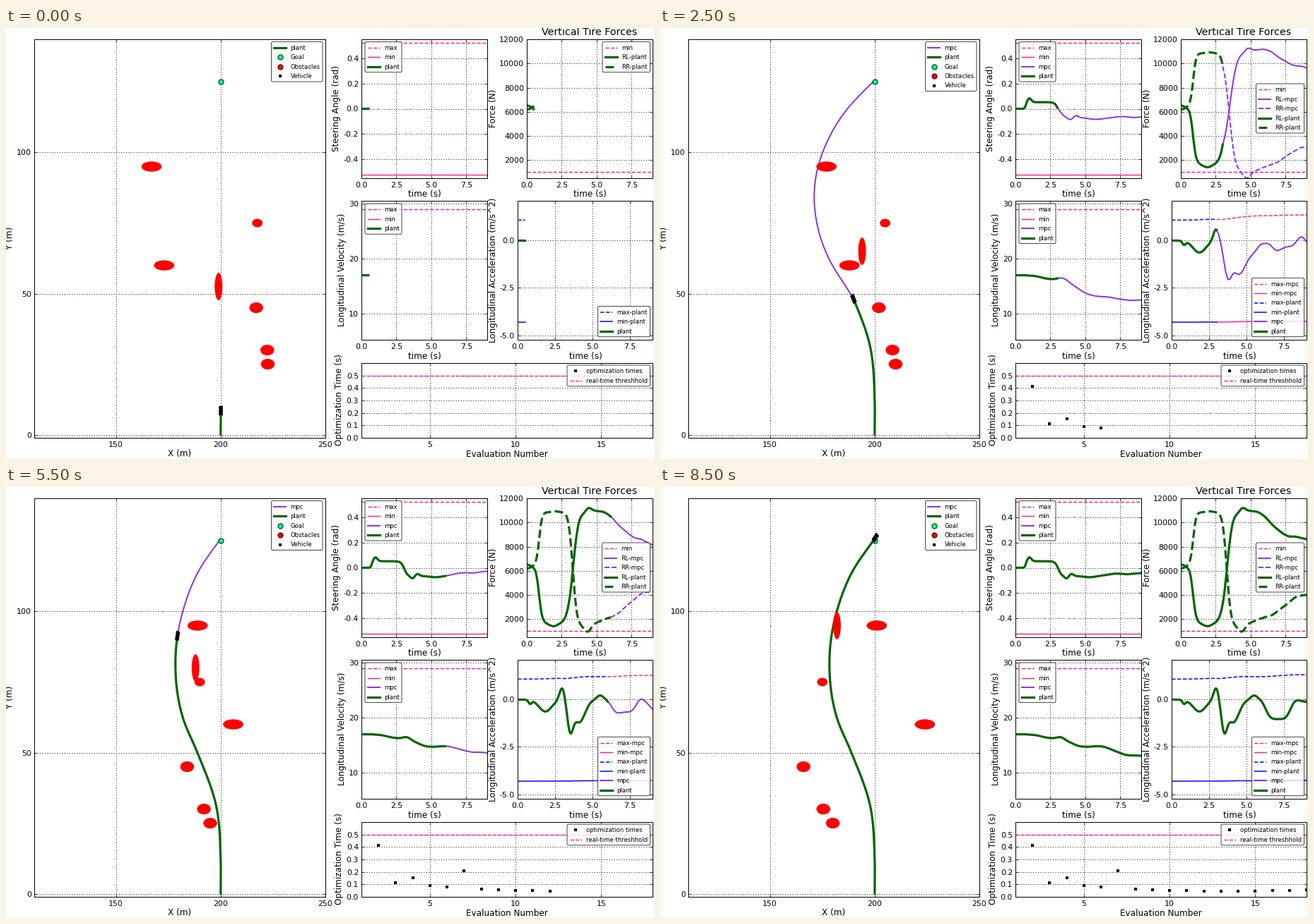
These frames come from a looping animation (917 px wide and 611 px high, 9000 ms). A matplotlib script:

```python
import numpy as np
import matplotlib.pyplot as plt
from matplotlib.animation import FuncAnimation
from matplotlib.patches import Ellipse, FancyBboxPatch, Polygon

W, H = 917, 611
PX = 0.72  # points per pixel at 100 dpi
FRAMES, STEP = 18, 500
PINK, VIOLET, GREEN = "#ff1493", "#8a2be2", "#006400"

plt.rcParams.update({
    "font.family": "DejaVu Sans",
    "axes.unicode_minus": False,
    "axes.linewidth": PX,
    "axes.axisbelow": True,
})


def style(color, width, dash="-"):
    return dict(color=color, lw=width * PX, ls=dash)


def dot(shape, size, face, edge=0):
    return dict(ls="none", marker=shape, ms=size * PX, mfc=face,
                mec="black", mew=edge * PX)


LIMIT, LIMIT_DASH = style(PINK, 1.4), style(PINK, 1.4, "--")
BLUE, BLUE_DASH = style("blue", 1.5), style("blue", 1.5, "--")
MPC, MPC_DASH = style(VIOLET, 1.9), style(VIOLET, 1.9, "--")
PLANT, PLANT_DASH = style(GREEN, 3.2), style(GREEN, 3.2, "--")
GOAL = dot("o", 7.3, "#00ff7f", 0.9)
OBSTACLE = dot("o", 7.3, "red", 0.9)
VEHICLE = dot("s", 4, "black")
TIMING = dot("s", 3.2, "black")

fig = plt.figure(figsize=(W / 100, H / 100), dpi=100, facecolor="white")


def panel(box, xlim, ylim, xticks, yticks, fmt="%.1f"):
    left, top, right, bottom = box
    ax = fig.add_axes([left / W, 1 - bottom / H, (right - left) / W, (bottom - top) / H])
    ax.set(xlim=xlim, ylim=ylim)
    ax.set_xticks(xticks, [("%.1f" if xlim[1] == 9 else "%d") % v for v in xticks])
    ax.set_yticks(yticks, [fmt % v for v in yticks])
    ax.tick_params(direction="in", top=True, right=True, length=4 * PX,
                   width=0.7 * PX, labelsize=11 * PX)
    ax.tick_params(axis="x", pad=5 * PX)
    ax.tick_params(axis="y", pad=4 * PX)
    ax.grid(color="black", lw=0.7 * PX, ls=(0, (2, 3)))
    return ax


SECONDS = [0, 2.5, 5, 7.5]
world = panel((40, 16, 452, 581), (111, 250), (-1.1, 140.1),
              [150, 200, 250], [0, 50, 100], "%d")
steer_ax = panel((503, 16, 681, 213), (0, 9), (-0.55, 0.55),
                 SECONDS, [-0.4, -0.2, 0, 0.2, 0.4])
force_ax = panel((737, 16, 915, 213), (0, 9), (0.5, 12),
                 SECONDS, [2, 4, 6, 8, 10, 12], "%d000")
speed_ax = panel((503, 245, 681, 442), (0, 9), (5.3, 30.5),
                 SECONDS, [10, 20, 30], "%d")
accel_ax = panel((724, 245, 915, 442), (0, 9), (-5.24, 2.1),
                 SECONDS, [-5, -2.5, 0])
timing_ax = panel((503, 475, 915, 581), (1, 18), (0, 0.6),
                  [5, 10, 15], [0, 0.1, 0.2, 0.3, 0.4, 0.5])

# Overlay in pixel coordinates for labels and legends
over = fig.add_axes([0, 0, 1, 1], zorder=5)
over.set(xlim=(0, W), ylim=(H, 0))
over.set_axis_off()


def label(x, y, text, size=12, angle=0):
    over.text(x, y, text, fontsize=size * PX, rotation=angle, ha="center", va="center")


for x, y in [(592, 236), (826, 236), (592, 465), (820, 465)]:
    label(x, y, "time (s)")
label(246, 604, "X (m)")
label(709, 604, "Evaluation Number")
label(826, 6.5, "Vertical Tire Forces", 14.3)
label(5, 298, "Y (m)", angle=90)
label(468, 114, "Steering Angle (rad)", angle=90)
label(689, 114, "Force (N)", angle=90)
label(475, 343, "Longitudinal Velocity (m/s)", angle=90)
label(689, 343, "Longitudinal Acceleration (m/s^2)", angle=90)
label(472, 527, "Optimization Time (s)", angle=90)


def legend(left, top, right, rows):
    height = 16.4 + 13.4 * (len(rows) - 1)
    frame = FancyBboxPatch((left, top), right - left, height,
                           boxstyle="round,pad=0,rounding_size=2", fc="white",
                           ec="black", lw=0.9 * PX, alpha=0.8, zorder=2)
    parts = [over.add_patch(frame)]
    for i, (text, look) in enumerate(rows):
        y = top + 8.4 + 13.4 * i
        xs = [left + 12] if "marker" in look else [left + 3.5, left + 20.5]
        parts += over.plot(xs, [y] * len(xs), zorder=3, **look)
        parts.append(over.text(left + 27, y + 3, text, fontsize=8.5 * PX, zorder=3))
    return parts


world_rows = [("plant", PLANT), ("Goal", GOAL), ("Obstacles", OBSTACLE), ("Vehicle", VEHICLE)]
limit_rows = [("max", LIMIT_DASH), ("min", LIMIT)]
mpc_row, plant_row = [("mpc", MPC)], [("plant", PLANT)]
force_rows = [("RL-plant", PLANT), ("RR-plant", PLANT_DASH)]
accel_rows = [("max-plant", BLUE_DASH), ("min-plant", BLUE)]

first_legends = (
    legend(375.5, 19.5, 448, world_rows)
    + legend(508, 19.5, 560, limit_rows + plant_row)
    + legend(844, 19.5, 911.5, [("min", LIMIT_DASH)] + force_rows)
    + legend(508, 249, 560, limit_rows + plant_row)
    + legend(837.5, 394.5, 911.5, accel_rows + plant_row)
)
full_legends = (
    legend(375.5, 19.5, 448, mpc_row + world_rows)
    + legend(508, 19.5, 560, limit_rows + mpc_row + plant_row)
    + legend(843.5, 79, 911.5, [("min", LIMIT_DASH), ("RL-mpc", MPC),
                                ("RR-mpc", MPC_DASH)] + force_rows)
    + legend(508, 249, 560, limit_rows + mpc_row + plant_row)
    + legend(837.5, 354.3, 911.5, [("max-mpc", LIMIT_DASH), ("min-mpc", LIMIT)]
             + accel_rows + mpc_row + plant_row)
)
legend(794, 478, 911.5, [("optimization times", TIMING), ("real-time threshhold", LIMIT_DASH)])


def bell(x, center, width, power=2):
    return np.exp(-np.abs((x - center) / width) ** power)


def step(x, center, width):
    return 0.5 + 0.5 * np.tanh((x - center) / width)


def integral(y, x):
    return np.concatenate([[0], np.cumsum((y[1:] + y[:-1]) / 2 * np.diff(x))])


def smooth(x, xp, yp):
    """Cubic Hermite curve through the given points."""
    xp, yp = np.asarray(xp, float), np.asarray(yp, float)
    slope = np.gradient(yp, xp)
    i = np.clip(np.searchsorted(xp, x) - 1, 0, len(xp) - 2)
    h = xp[i + 1] - xp[i]
    u = (x - xp[i]) / h
    return ((1 + 2 * u) * (1 - u) ** 2 * yp[i] + u * (1 - u) ** 2 * h * slope[i]
            + u * u * (3 - 2 * u) * yp[i + 1] + u * u * (u - 1) * h * slope[i + 1])


# Driver inputs over time
def steer(t):
    turns = 0.052 * (step(t, 0.75, 0.1) - step(t, 3, 0.25))
    turns += 0.022 * step(t, 6.6, 0.6) - 0.065 * step(t, 3.1, 0.2)
    wobble = 0.03 * bell(t, 1, 0.2) - 0.02 * bell(t, 3.65, 0.2) + 0.017 * bell(t, 4, 0.2)
    return turns + wobble - 0.01 * bell(t, 5.3, 0.6) - 0.008 * bell(t, 8, 0.5)


def accel(t):
    early = 0.65 * bell(t, 2.97, 0.25) - 0.2 * bell(t, 0.83, 0.15) - 0.63 * bell(t, 1.85, 0.6)
    brake = -1.4 * bell(t, 3.5, 0.27) - 1.2 * bell(t, 4.1, 0.55)
    late = 0.22 * bell(t, 5.5, 0.3) - 1.03 * bell(t, 7.1, 0.9, 4) - 0.12 * bell(t, 9, 0.5)
    return early + brake + late


def load(t):
    """Weight moved from the left to the right rear tire."""
    swing = 4.6 * step(t, 0.88, 0.22) - 9.4 * step(t, 3.3, 0.34) + 2.6 * step(t, 6.8, 1.4)
    settle = 0.19 * np.maximum(0, 1 - 2 * t)
    return swing - settle + 0.15 * bell(t, 1.95, 0.4) - 0.4 * bell(t, 4.4, 0.3)


def forces(a, moved):
    mean = 6.35 + 0.3 * a
    return mean - moved, mean + moved


def accel_max(v):
    return 1.08 + 0.06 * (17 - v)


def accel_min(v):
    return -4.31 + 0.011 * (17 - v)


def route_x(y):
    return smooth(y, [0, 12, 32, 50, 62, 80, 100, 115, 125.6],
                  [200, 200, 197.6, 188.9, 182.1, 178.4, 181.9, 190, 199.8])


# Speed and distance follow from the acceleration
TIME = np.linspace(0, 9, 901)
SPEED = 17 + integral(accel(TIME), TIME)
TRAVEL = integral(SPEED, TIME)
ROUTE_Y = np.linspace(0, 127, 1271)
ROUTE_X = route_x(ROUTE_Y)
LENGTH = np.concatenate([[0], np.cumsum(np.hypot(np.diff(ROUTE_X), np.diff(ROUTE_Y)))])


def speed(t):
    return np.interp(t, TIME, SPEED)


def route_y(t):
    return np.interp(np.interp(t, TIME, TRAVEL), LENGTH, ROUTE_Y)


U = np.linspace(0, 1, 41)


def plan(k, t):
    """Predicted signals: the drive to come, altered by a detour, a rush or a slowdown."""
    detour, rush, slow = bell(k, 4, 1.2), bell(k, 9, 1.7), bell(k, 13, 2)
    ahead = t + (9 - 0.55 * bell(k, 9, 1) - t) * U
    late = ahead - 0.9 * detour * (1 - np.exp(t - ahead))
    a = accel(late) + 1.8 * rush * np.sin(np.pi * U) - slow * U ** 2
    a -= 1.4 * detour * np.sin(2 * np.pi * U ** 1.3)
    moved = load(late) + (slow - 1.8 * detour) * U
    angle = steer(late) + (0.015 - 0.07 * detour) * U
    return ahead, angle, speed(t) + integral(a, ahead), a, moved


def plan_path(k, y):
    ys = y + (125 - y) * np.sin(np.pi / 2 * U)
    part = (ys - y) / (125 - y)
    bulge = np.abs(np.sin(np.pi * part ** 1.1)) ** 0.9
    return route_x(ys) - 15 * bell(k, 4, 1.2) * bulge, ys


def solve_time(n):
    spikes = {2: 0.29, 4: 0.05, 7: 0.14}
    return 0.046 + 0.0006 * (n - 13.5) ** 2 + spikes.get(n, 0)


# Start x, start y, velocity x, velocity y, width, height
OBSTACLES = [
    (165, 95, 4, 0, 9.7, 3.6), (220, 75, -5, 0, 5, 3), (170, 60, 6, 0, 9.7, 3.6),
    (200, 50, -2, 5, 3.7, 9.7), (220, 45, -6, 0, 6.6, 3.8),
    (225, 30, -5.5, 0, 6.6, 3.8), (225, 25, -5, 0, 6.6, 3.8),
]

steer_ax.axhline(np.pi / 6, **LIMIT_DASH)
steer_ax.axhline(-np.pi / 6, **LIMIT)
speed_ax.axhline(29, **LIMIT_DASH)
force_ax.axhline(1, **LIMIT_DASH)
timing_ax.axhline(0.5, **LIMIT_DASH)


def line(ax, look):
    return ax.plot([], [], **look)[0]


path_mpc, path_plant = line(world, MPC), line(world, PLANT)
world.plot([200], [125], zorder=3, **GOAL)
blobs = [world.add_patch(Ellipse((x, y), w, h, fc="red", ec="none", zorder=4))
         for x, y, _, _, w, h in OBSTACLES]
car = world.add_patch(Polygon([[0, 0], [1, 0], [1, 1]], fc="black", ec="none", zorder=5))
CORNERS = np.array([[-0.93, -1.65], [0.93, -1.65], [0.93, 1.65], [-0.93, 1.65]])

# Same order as the curves returned by traces()
mpc_lines = [line(accel_ax, LIMIT_DASH), line(accel_ax, LIMIT), line(steer_ax, MPC),
             line(speed_ax, MPC), line(accel_ax, MPC), line(force_ax, MPC),
             line(force_ax, MPC_DASH)]
plant_lines = [line(accel_ax, BLUE_DASH), line(accel_ax, BLUE), line(steer_ax, PLANT),
               line(speed_ax, PLANT), line(accel_ax, PLANT), line(force_ax, PLANT),
               line(force_ax, PLANT_DASH)]
dots = line(timing_ax, TIMING)


def traces(angle, v, a, moved):
    return [accel_max(v), accel_min(v), angle, v, a, *forces(a, moved)]


def update(k):
    t = 0.5 * (k + 1)
    past = np.linspace(0, t, int(t * 40) + 1)
    y = route_y(t)
    x = route_x(y)

    ys = route_y(past)
    path_plant.set_data(route_x(ys), ys)
    path_mpc.set_data(*plan_path(k, y))

    for blob, (x0, y0, vx, vy, _, _) in zip(blobs, OBSTACLES):
        blob.set_center((x0 + vx * t, y0 + vy * t))

    a = np.arctan(x - route_x(y - 1))
    turn = np.array([[np.cos(a), -np.sin(a)], [np.sin(a), np.cos(a)]])
    car.set_xy(CORNERS @ turn + [x, y])

    driven = traces(steer(past), speed(past), accel(past), load(past))
    for curve, values in zip(plant_lines, driven):
        curve.set_data(past, values)
    ahead, *signals = plan(k, t)
    for curve, values in zip(mpc_lines, traces(*signals)):
        curve.set_data(ahead, values)

    runs = range(2, k + 2)
    dots.set_data(runs, [solve_time(n) for n in runs])

    for part in [path_mpc] + mpc_lines + full_legends:
        part.set_visible(k > 0)
    for part in first_legends:
        part.set_visible(k == 0)
    return []


anim = FuncAnimation(fig, update, frames=FRAMES, interval=STEP, repeat=True,
                     repeat_delay=0, blit=False, init_func=lambda: update(0))
plt.show()
```
